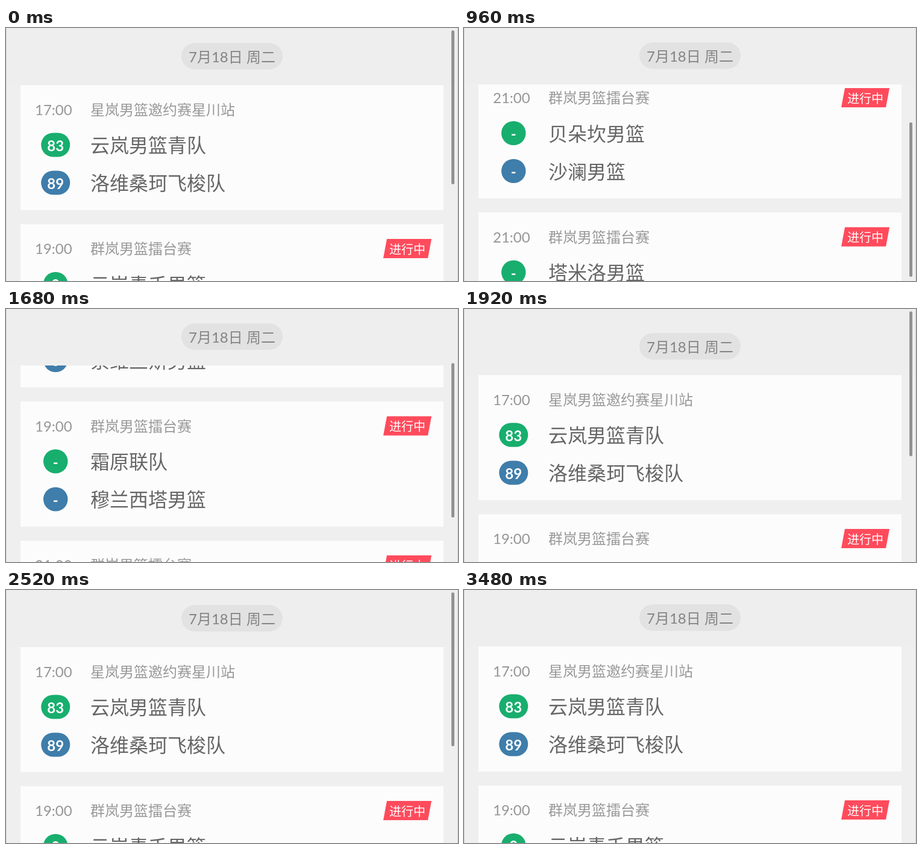
An HTML page that plays this animation: 750x421 px, repeating every 3.6 s.

```html
<!DOCTYPE html>
<html lang="zh-CN">
<head>
<meta charset="utf-8">
<style>
html, body { margin: 0; width: 100%; height: 100%; overflow: hidden; background: #efefef; }
svg { display: block; width: 750px; height: 421px; }
text { font: 24px Lato, "Noto Sans CJK SC", "Noto Sans CJK", sans-serif; fill: #969696; }
.mid { text-anchor: middle; }
.zh { font-family: "Noto Sans CJK SC", "Noto Sans CJK", sans-serif; font-weight: 350; }
.event { fill: #999; }
.team { font-size: 32px; fill: #666; }
.score { font-weight: 700; fill: #fff; }
.live { font-size: 20px; fill: #fff; }
.date { fill: #848484; }
</style>
</head>
<body>
<svg viewBox="0 0 750 421">
  <rect width="750" height="421" fill="#efefef"/>
  <g id="list"></g>
  <g id="head">
    <rect y="-100" width="750" height="194" fill="#eee"/>
    <rect x="291" y="24" width="168" height="44" rx="22" fill="#e2e2e2"/>
    <text class="mid date" x="375" y="56">7<tspan class="zh">月</tspan>18<tspan class="zh">日</tspan> <tspan class="zh">周二</tspan></text>
  </g>
  <path d="M.5 0V421M749.5 0V421" stroke="#d6d6d6"/>
  <rect id="bar" x="739" width="5" rx="2.5" fill="#929292"/>
</svg>
<script>
const cup = '群岚男篮擂台赛';
const games = [
  ['17:00', '星岚男篮邀约赛星川站', '云岚男篮青队', '洛维桑珂飞梭队', 83, 89],
  ['19:00', cup, '云岚青禾男篮', '索维兰斯男篮', 0, 0],
  ['19:00', cup, '霜原联队', '穆兰西塔男篮', '-', '-'],
  ['21:00', cup, '贝朵坎男篮', '沙澜男篮', '-', '-'],
  ['21:00', cup, '塔米洛男篮', '朵兰维男篮', '-', '-'],
];
const PITCH = 231.5;
const $ = id => document.getElementById(id);

function row(y, team, score, color) {
  const w = score > 9 ? 48 : 40.5;
  return `<rect x="${82.25 - w / 2}" y="${y}" width="${w}" height="40" rx="20" fill="${color}"/>
    <text class="mid score" x="82.2" y="${y + 30}">${score}</text>
    <text class="zh team" x="140" y="${y + 32.5}">${team}</text>`;
}

const live = `<path d="M632 24.5H706L700 56.5H626Z" fill="#ff4b5c"/>
  <text class="zh live" x="636" y="49">进行中</text>`;

$('list').innerHTML = games.map(([time, event, a, b, sa, sb], i) =>
  `<g transform="translate(0 ${i * PITCH})">
    <rect x="24" width="702" height="208" fill="#fcfcfc"/>
    <text x="48" y="49.7">${time}</text>
    <text class="zh event" x="140" y="49.7">${event}</text>
    ${row(79.5, a, sa, '#18ae6e')}${row(142.5, b, sb, '#3f7daa')}${i ? live : ''}
  </g>`).join('');

// Fling down, fling back, then a damped bounce at the top edge.
const HIT = 1906.8;
function scrollAt(t) {
  if (t < 8) return -1;
  if (t > HIT) return -1.402 * (t - HIT) * Math.exp(-0.01036 * (t - HIT));
  const down = 838 * (1 - Math.exp((8 - t) / 500));
  const back = 1105 * Math.exp((1680 - t) / 500) - 702;
  return Math.min(down, back);
}

function draw(now) {
  const t = Math.floor(now % 3600 / 120) * 120;
  const s = Math.round(scrollAt(t));
  const over = Math.max(0, -s);
  const bar = $('bar');
  $('list').setAttribute('transform', `translate(0 ${94 - s})`);
  $('head').setAttribute('transform', `translate(0 ${over})`);
  bar.setAttribute('y', 4 + Math.round(0.214 * Math.max(0, s)));
  bar.setAttribute('height', 257 - over);
  // The bar fades away once the list has come to rest.
  bar.setAttribute('opacity', Math.min(1, Math.max(0, (2940 - t) / 300)));
}

const start = performance.now();
function tick() {
  draw(performance.now() - start);
  requestAnimationFrame(tick);
}
tick();
</script>
</body>
</html>
```
